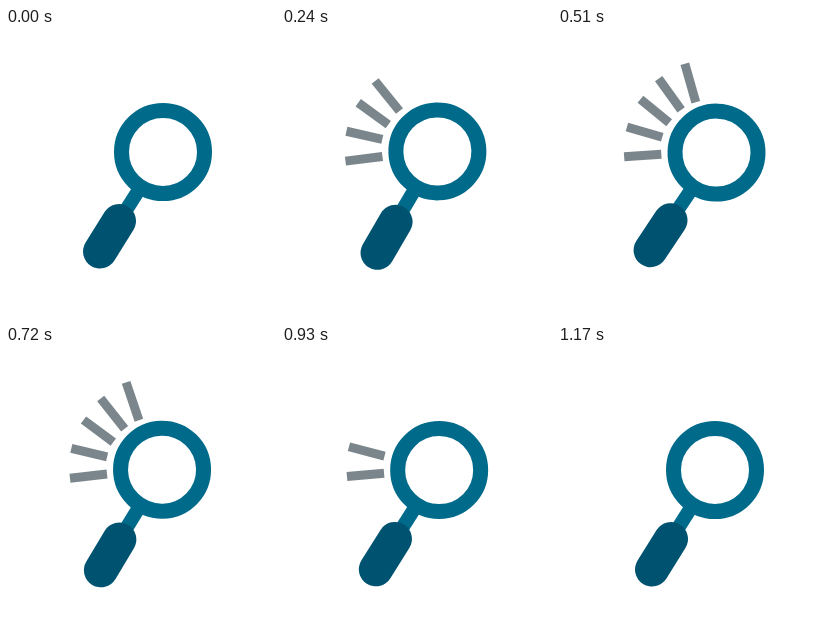
An HTML page for the animation above (1.8 s loop, 270x290 px).

```html
<!DOCTYPE html>
<html lang="en">
<head>
<meta charset="utf-8">
<title>Magnifier</title>
<style>
  html, body { margin: 0; width: 100%; height: 100%; overflow: hidden; background: #fff; }
  svg { display: block; width: 270px; height: 290px; }
</style>
</head>
<body>
<svg viewBox="0 0 270 290" fill="none">
  <g id="glass">
    <g id="rays" stroke="#7b868c" stroke-width="9">
      <path d="M64.8 130.8L101.9 127.3"/>
      <path d="M66.7 101L102.3 110.2"/>
      <path d="M79.4 72.9L108.8 95.6"/>
      <path d="M97 51.7L120.4 82.4"/>
      <path d="M122.7 36.1L134.8 74.2"/>
    </g>
    <path d="M135 158.5L116 188.5" stroke="#006a8b" stroke-width="14"/>
    <circle cx="157" cy="124" r="41.5" stroke="#006a8b" stroke-width="15"/>
    <path d="M113 193L94 223.5" stroke="#005370" stroke-width="34" stroke-linecap="round"/>
  </g>
</svg>
<script>
const LOOP = 1800, STEP = 30, FADE = 60;
const FADE_OUT_START = 750;
// [time in ms, tilt in degrees]
const tilts = [[0, 0], [240, -1.8], [510, 1.7], [790, -1.55], [1050, 1.55], [1170, 0]];
const glass = document.getElementById('glass');
const rays = [...document.getElementById('rays').children];

const clamp = x => Math.min(1, Math.max(0, x));
const ease = u => (1 - Math.cos(Math.PI * u)) / 2;

function tiltAt(t) {
  const i = tilts.findIndex(([time]) => time > t);
  if (i < 0) return 0;
  const [t0, a] = tilts[i - 1], [t1, b] = tilts[i];
  return a + (b - a) * ease((t - t0) / (t1 - t0));
}

// Rays fade in one after another and leave in reverse order.
function rayOpacity(i, t) {
  const shown = clamp(t / FADE - i);
  const hidden = clamp((t - FADE_OUT_START) / FADE - (rays.length - 1 - i));
  return shown - hidden;
}

function draw(now) {
  const t = Math.floor((now % LOOP) / STEP) * STEP;
  glass.setAttribute('transform', `rotate(${tiltAt(t)} 137 175)`);
  rays.forEach((ray, i) => ray.setAttribute('opacity', rayOpacity(i, t)));
}

let start;
function tick(now) {
  start ??= now;
  draw(now - start);
  requestAnimationFrame(tick);
}
draw(0);
requestAnimationFrame(tick);
</script>
</body>
</html>
```
